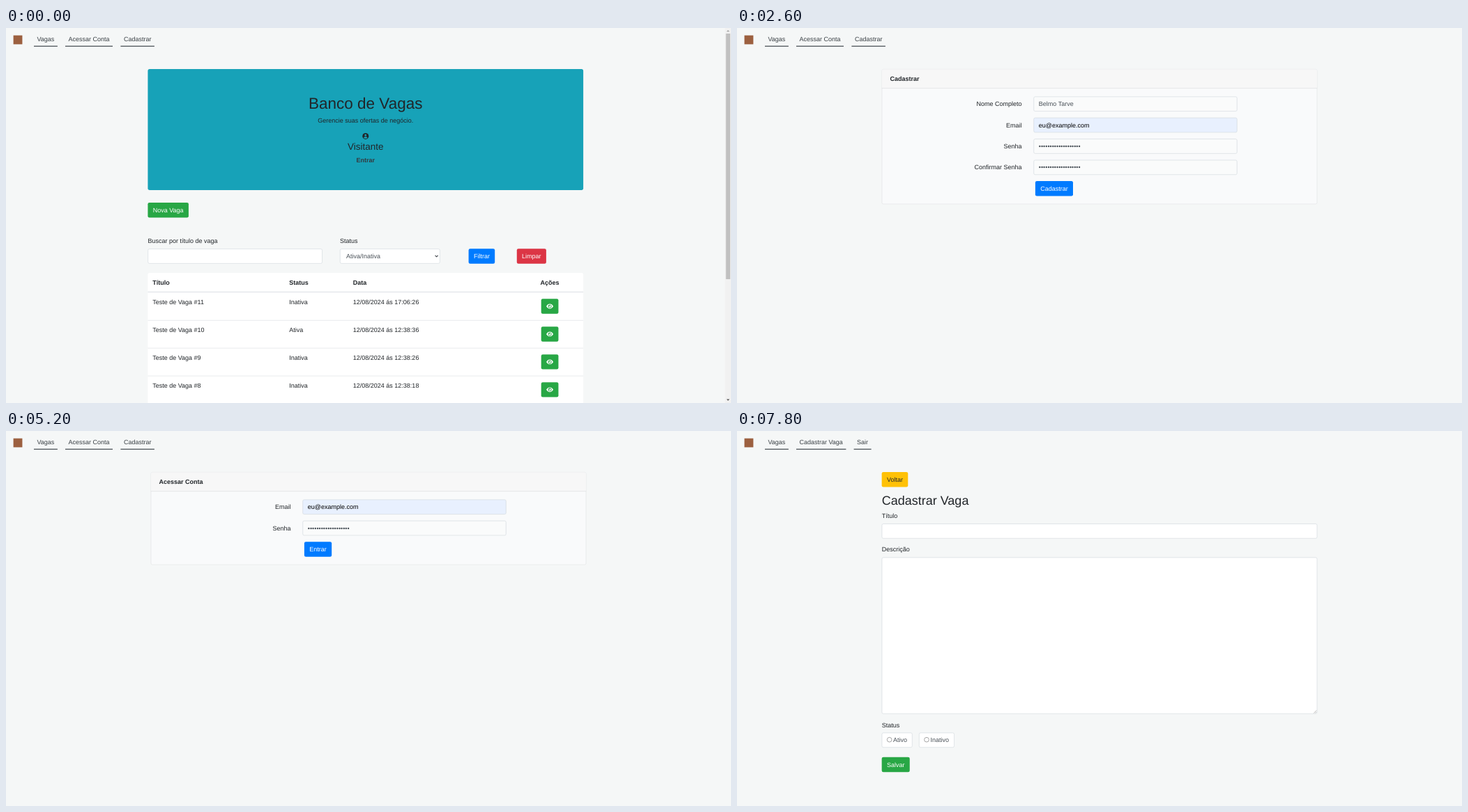
Animation of 1040 by 539 pixels, one loop 8000 ms. Source, as an HTML page:

```html
<!DOCTYPE html>
<html lang="pt-BR">
<head>
<meta charset="utf-8">
<title>Banco de Vagas</title>
<style>
  html, body { margin: 0; width: 100%; height: 100%; overflow: hidden; background: #f5f7f7; }
  svg { display: block; width: 1040px; height: 539px; }
  text { font-family: "Liberation Sans", Arial, sans-serif; text-rendering: geometricPrecision; white-space: pre; }
</style>
</head>
<body>
<svg id="stage" viewBox="0 0 1040 539"></svg>
<script>
const INK = '#212529', MUTED = '#495057', LINE = '#ced4da';
const GREEN = '#28a745', BLUE = '#007bff', RED = '#dc3545', YELLOW = '#ffc107', TEAL = '#17a2b8';
const PX = 0.56277;            // one CSS pixel of the page on the stage
const CONTROL = 38 * PX;       // height of inputs and buttons
const WIDTH = 1110 * PX;       // container width
const FORM_X = 207.66, LIST_X = 203.44;

// Text is placed by the vertical centre of its line.
const text = (x, mid, str, { size = 9, fill = INK, anchor = 'start', bold = false } = {}) =>
  `<text x="${x}" y="${mid + size * 0.3465}" font-size="${size}" fill="${fill}" text-anchor="${anchor}"` +
  `${bold ? ' font-weight="700"' : ''}>${str}</text>`;

const rect = (x, y, w, h, fill, r = 0) =>
  `<rect x="${x}" y="${y}" width="${w}" height="${h}" rx="${r}" fill="${fill}"/>`;

const field = (x, y, w, h = CONTROL, fill = '#fff', stroke = LINE) =>
  `<rect x="${x + PX / 2}" y="${y + PX / 2}" width="${w - PX}" height="${h - PX}" rx="2" ` +
  `fill="${fill}" stroke="${stroke}" stroke-width="${PX}"/>`;

const button = (x, y, w, label, fill, color = '#fff') =>
  rect(x, y, w, CONTROL, fill, 2.25) +
  text(x + w / 2, y + CONTROL / 2, label, { fill: color, anchor: 'middle' });

const icons = {
  eye: bg => `<path d="M-5 0Q-3-3.4 0-3.4T5 0Q3 3.4 0 3.4T-5 0Z" fill="#fff"/>
    <circle r="2.5" fill="${bg}"/><circle r="1.7" fill="#fff"/><circle cx="-.8" cy="-.8" r=".85" fill="${bg}"/>`,
  edit: () => `<path d="M.2-2.9H-3Q-4-2.9-4-1.9V2.9Q-4 3.9-3 3.9H1.8Q2.8 3.9 2.8 2.9V.4" fill="none" stroke="#fff" stroke-width="1.1"/>
    <path d="M-1.6 1.7l.4-2L2.2-3.7 3.9-2 .4 1.3ZM2.7-4.1l.4-.4Q3.6-4.8 4.1-4.3l.4.4Q4.9-3.4 4.6-2.9l-.4.5Z" fill="#fff"/>`,
  trash: bg => `<path d="M-3.9-3.9H-1.6L-1.2-4.5H1.2L1.6-3.9H3.9V-2.8H-3.9ZM-3.4-2.2H3.4L3 3.7Q2.9 4.5 2.2 4.5H-2.2Q-2.9 4.5-3 3.7Z" fill="#fff"/>
    <path d="M-1.6-1V3.2M0-1V3.2M1.6-1V3.2" stroke="${bg}" stroke-width=".45"/>`
};
const iconButton = (x, y, w, icon, fill) =>
  rect(x, y, w, CONTROL, fill, 2.25) +
  `<g transform="translate(${x + w / 2} ${y + CONTROL / 2})">${icons[icon](fill)}</g>`;

const nav = links => rect(10.6, 10.6, 12.8, '12.8', '#9c6040') +
  links.map(([label, x, w]) =>
    text(x + 4.5, 16, label, { fill: '#3a4045' }) + rect(x, 25.6, w, 1.13, '#343a40')).join('');

const guestNav = nav([['Vagas', 40, 33.9], ['Acessar Conta', 85, 68], ['Cadastrar', 164.4, 48.5]]);
const userNav = nav([['Vagas', 40, 33.9], ['Cadastrar Vaga', 85, 71.4], ['Sair', 167.6, 25]]);

function formCard(title, rows, action, actionWidth) {
  const rowY = i => 98.5 + i * 54 * PX;
  const top = 59, height = rowY(rows.length) + CONTROL + 11.8 - top;
  return guestNav +
    field(FORM_X, top, WIDTH, height, '#f9fafb', '#dfe1e2') +
    rect(FORM_X + PX, top + PX, WIDTH - 2 * PX, 27, '#f7f7f7', 1.5) +
    rect(FORM_X, 86.5, WIDTH, PX, '#d8dadb') +
    text(219.5, 72.8, title, { bold: true }) +
    rows.map(([label, value = '', autofill], i) => {
      const y = rowY(i), mid = y + CONTROL / 2;
      return text(408.55, mid, label, { anchor: 'end' }) +
        field(425.45, y, 292.1, CONTROL, autofill ? '#e8f0fe' : '#fafbfb') +
        text(432.8, mid, value, { fill: autofill ? '#000' : MUTED });
    }).join('') +
    button(427.9, rowY(rows.length), actionWidth, action, BLUE);
}

const jobs = [
  ['#11', 'Inativa', '17:06:26'], ['#10', 'Ativa', '12:38:36'],
  ['#9', 'Inativa', '12:38:26'], ['#8', 'Inativa', '12:38:18']
];

function jobList(menu, user, link, [statusX, dateX, actionsX], actions) {
  const mid = LIST_X + WIDTH / 2, centred = { anchor: 'middle' };
  const head = (x, label, anchor) => text(x, 365.6, label, { bold: true, anchor });
  const banner = rect(LIST_X, 59, WIDTH, 174, TEAL, 2.7) +
    text(mid, 108.5, 'Banco de Vagas', { size: 22.5, ...centred }) +
    text(mid, 133.2, 'Gerencie suas ofertas de negócio.', centred) +
    `<circle cx="${mid}" cy="155.4" r="4.5" fill="${INK}"/><circle cx="${mid}" cy="154" r="1.5" fill="${TEAL}"/>
     <path d="M${mid - 2.7} 158q.2-1.8 1.8-1.8h1.8q1.6 0 1.8 1.8q-2.7 2-5.4 0Z" fill="${TEAL}"/>` +
    text(mid, 170.2, user, { size: 13.5, ...centred }) +
    text(mid, 190, link, { bold: true, fill: '#343a40', ...centred });
  const filters = button(LIST_X, 251, 58.5, 'Nova Vaga', GREEN) +
    text(LIST_X, 305.9, 'Buscar por título de vaga') + field(LIST_X, 317.3, 250.4) +
    text(479, 305.9, 'Status') + field(479, 317.3, 143.6) +
    text(488, 328, 'Ativa/Inativa', { fill: MUTED }) +
    `<path d="M615.6 326.8l2 2 2-2" fill="none" stroke="#343a40" stroke-width="1.1"/>` +
    button(663.6, 317.3, 37.6, 'Filtrar', BLUE) + button(732.8, 317.3, 42.1, 'Limpar', RED);
  const table = rect(LIST_X, 352, WIDTH, 200, '#fff', 2.25) +
    head(210.2, 'Título') + head(statusX, 'Status') + head(dateX, 'Data') + head(actionsX, 'Ações', 'middle') +
    rect(LIST_X, 378.9, WIDTH, 1.13, '#dee2e6') +
    jobs.map(([id, status, time], i) => {
      const y = 379.9 + i * 71 * PX, line = y + 13.8;
      return (i ? rect(LIST_X, y, WIDTH, PX, '#d6dade') : '') +
        text(210.2, line, 'Teste de Vaga ' + id) + text(statusX, line, status) +
        text(dateX, line, `12/08/2024 ás ${time}`) +
        actions.map(([x, w, icon, fill]) => iconButton(x, y + 9.4, w, icon, fill)).join('');
    }).join('');
  const scrollbar = rect(1031.56, 0, 8.44, 539, '#f1f1f1') + rect(1032.7, 8, 6.2, 353, '#c1c1c1') +
    `<path d="M1033.6 5.3h4.4l-2.2-2.4Z" fill="#a3a3a3"/><path d="M1033.6 533.4h4.4l-2.2 2.4Z" fill="#505050"/>`;
  return menu + banner + filters + table + scrollbar;
}

function newJob() {
  const radio = (x, w, label) => field(x, 433.6, w) +
    `<circle cx="${x + 11}" cy="443.7" r="3.35" fill="#fff" stroke="#767676" stroke-width=".65"/>` +
    text(x + 16.4, 444.2, label, { fill: MUTED });
  return userNav + button(FORM_X, 59, 37.6, 'Voltar', YELLOW, INK) +
    text(FORM_X, 100.2, 'Cadastrar Vaga', { size: 18 }) +
    text(FORM_X, 121.9, 'Título') + field(FORM_X, 133.2, WIDTH) +
    text(FORM_X, 170.3, 'Descrição') + field(FORM_X, 181.6, WIDTH, 225) +
    `<path d="M827.3 405.6l4-4M829.5 405.6l1.8-1.8" stroke="#777" stroke-width=".5"/>` +
    text(FORM_X, 422.4, 'Status') + radio(FORM_X, 43.9, 'Ativo') + radio(261, 50.8, 'Inativo') +
    button(FORM_X, 468.8, 40.1, 'Salvar', GREEN);
}

const name = 'Belmo Tarve', email = 'eu@example.com', password = '•'.repeat(19);
const signUp = (...v) => formCard('Cadastrar',
  [['Nome Completo', v[0]], ['Email', v[1], v[1]], ['Senha', v[2]], ['Confirmar Senha', v[2]]], 'Cadastrar', 54.1);
const signIn = (...v) => formCard('Acessar Conta', [['Email', v[0], v[0]], ['Senha', v[1]]], 'Entrar', 39.3);

const scenes = [
  jobList(guestNav, 'Visitante', 'Entrar', [406.2, 497.8, 780], [[767.7, 24.75, 'eye', GREEN]]),
  signUp(),
  signUp(name, email, password),
  signIn(),
  signIn(email, password),
  jobList(userNav, 'Belmo Tar', 'Sair', [371.5, 446.9, 733.2],
    [[690.7, 24.75, 'eye', GREEN], [722.4, 23.6, 'edit', BLUE], [753.1, 22.5, 'trash', RED]]),
  newJob()
];

const stage = document.getElementById('stage');
const SCENE_MS = 1300, LOOP_MS = 8000;
let shown = -1;
function draw() {
  const index = Math.floor(performance.now() % LOOP_MS / SCENE_MS);
  if (index !== shown) stage.innerHTML = scenes[shown = index];
  requestAnimationFrame(draw);
}
draw();
</script>
</body>
</html>
```
